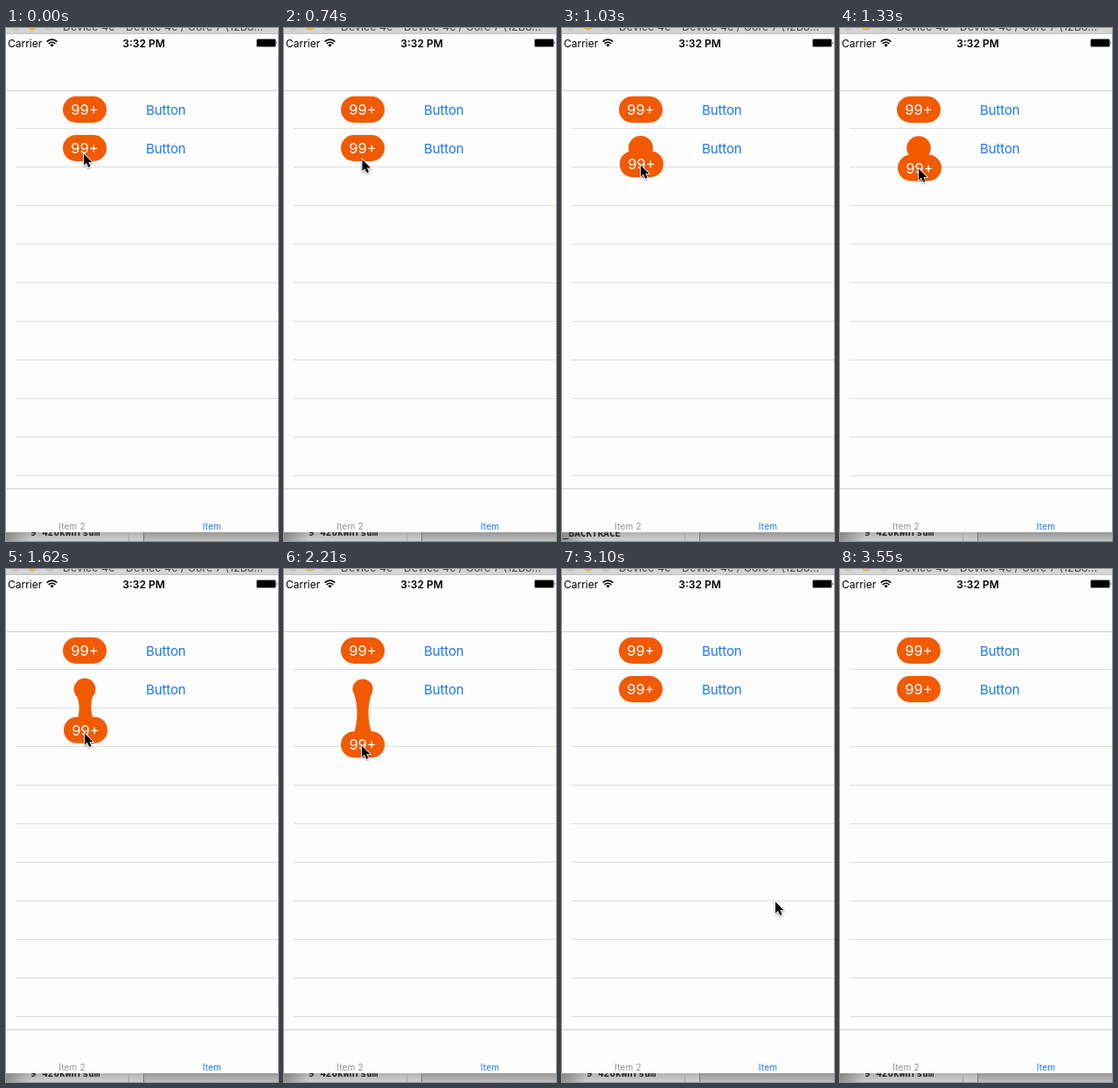
Recreate the animation shown at these times as an HTML page. Size 311 by 585 pixels, loop 3690 ms.

```html
<!DOCTYPE html>
<html lang="en">
<head>
<meta charset="utf-8">
<title>Draggable badge</title>
<style>
  html, body { margin: 0; width: 100%; height: 100%; overflow: hidden; background: #fdfdfd; }
  svg { display: block; width: 311px; height: 585px; font-family: Inter, Roboto, sans-serif; }
  .mono { font: bold 11px "DejaVu Sans Mono", monospace; fill: #222; }
  .button { font-size: 15px; fill: #1a78f5; letter-spacing: -.1px; }
  .badge { fill: #f25a00; }
  .badge text { font-size: 16.5px; fill: #fff; text-anchor: middle; }
  .tab { font-size: 10px; text-anchor: middle; letter-spacing: .2px; }
  #cursor { filter: drop-shadow(0 1px 1px #0006); }
</style>
</head>
<body>
<svg viewBox="0 0 311 585">
  <defs>
    <linearGradient id="shade" x2="0" y2="1">
      <stop stop-color="#989898"/><stop offset="1" stop-color="#bebebe"/>
    </linearGradient>
    <linearGradient id="corner">
      <stop stop-color="#555" stop-opacity=".5"/><stop offset="1" stop-color="#555" stop-opacity="0"/>
    </linearGradient>
    <clipPath id="desktop"><path d="M0 575H311V585H0Z"/></clipPath>
    <g id="pill" class="badge">
      <rect x="-25" y="-15" width="50" height="30" rx="15"/>
      <text y="6">99+</text>
    </g>
  </defs>

  <rect width="311" height="585" fill="#fdfdfd"/>

  <!-- window title bar -->
  <rect width="311" height="7" fill="#d5d4d5"/>
  <path d="M0 6.5H311" stroke="#c2c1c2"/>
  <g stroke-width=".7">
    <circle cx="10" cy="-4" r="6" fill="#d0cdcd" stroke="#b5b2b2"/>
    <circle cx="30" cy="-4" r="6" fill="#f6be35" stroke="#d9a02a"/>
    <circle cx="50" cy="-4" r="6" fill="#d0cdcd" stroke="#b5b2b2"/>
  </g>
  <text x="65" y="2.5" font-size="12.5" fill="#444">Device 4c - Device 4c / Core 7 (12B8…</text>

  <!-- status bar -->
  <g font-size="12">
    <text x="2" y="21.5">Carrier</text>
    <text x="157.5" y="21.5" font-weight="600" text-anchor="middle">3:32 PM</text>
  </g>
  <path d="M46.7 15.7A8 8 0 0 1 58.3 15.7M48.7 18A5 5 0 0 1 56.3 18" fill="none" stroke="#000" stroke-width="1.7"/>
  <path d="M52.5 21.5L50.4 19.4A3 3 0 0 1 54.6 19.4Z"/>
  <rect x="286.5" y="12.5" width="22" height="9" rx="1.5" stroke="#999"/>
  <path d="M309.500 15.500Q311 17 309.500 18.500Z"/>

  <!-- list and tab bar -->
  <rect id="highlight" y="114" width="311" height="45" fill="#d9d9d9"/>
  <path d="M0 71.5H311M0 525.5H311" stroke="#cfcfd1"/>
  <path id="separators" stroke="#dededf"/>
  <text class="button" x="160" y="98.5">Button</text>
  <text class="button" x="160" y="142.5">Button</text>
  <text class="tab" x="75.5" y="571.5" fill="#929292">Item 2</text>
  <text class="tab" x="235.5" y="571.5" fill="#1a78f5">Item</text>

  <!-- desktop below the window -->
  <g clip-path="url(#desktop)">
    <rect y="575" width="311" height="10" fill="url(#shade)"/>
    <rect y="575" width="157" height="10" fill="#fff" opacity=".25"/>
    <rect y="575" width="28" height="10" fill="url(#corner)"/>
    <path d="M140.5 575V585" stroke="#aaa"/>
    <path d="M157.5 575V585" stroke="#777"/>
    <text id="log" class="mono"></text>
  </g>

  <use href="#pill" x="90" y="93"/>
  <path id="neck" class="badge"/>
  <circle id="anchor" class="badge" cx="90" cy="137"/>
  <use id="dragged" href="#pill"/>
  <path id="cursor" d="M1 .5V13.500L4 10.800L6.200 15.800L8.500 14.800L6.400 10H10.500Z"
        stroke="#fff" stroke-width="1.6" paint-order="stroke"/>
</svg>
<script>
  const LOOP = 3690, TICK = LOOP / 25;
  const PRESS = 6, GRAB = 7, RELEASE = 18;
  const HOME = { x: 90, y: 137 };
  const $ = id => document.getElementById(id);

  // Cursor path: tick, x, y
  const path = [
    [3, 88, 143], [7, 89, 156], [9, 89, 160], [11, 89, 187], [15, 88, 201], [16, 87, 207],
    [19, 87, 207], [20, 100, 217], [21, 243, 379], [22, 261, 508], [24, 298, 646]
  ];

  function cursorAt(tick) {
    const next = path.findIndex(key => key[0] > tick);
    const [t1, x1, y1] = path.at(Math.max(next, 0) - 1);
    if (next < 1) return next ? { x: x1, y: y1 } : { x: path[0][1], y: path[0][2] };
    const [t2, x2, y2] = path[next];
    const u = (tick - t1) / (t2 - t1);
    return { x: x1 + (x2 - x1) * u, y: y1 + (y2 - y1) * u };
  }

  // The badge trails the cursor by a quarter of a tick.
  function badgeAt(tick) {
    const { x, y } = cursorAt(tick - .25);
    return { x: x + 2, y };
  }

  const show = (id, visible) => $(id).setAttribute("visibility", visible ? "visible" : "hidden");
  const set = (id, attributes) => {
    for (const name in attributes) $(id).setAttribute(name, attributes[name]);
  };

  // Two curves bent toward the midpoint join the shrinking anchor to the badge.
  function drawNeck(end) {
    const dx = end.x - HOME.x, dy = end.y - HOME.y, distance = Math.hypot(dx, dy);
    const r = 15 - distance / 18;
    const side = (p, k) => `${p.x + dy / distance * k} ${p.y - dx / distance * k}`;
    const middle = `${HOME.x + dx / 2} ${HOME.y + dy / 2}`;
    set("anchor", { r });
    set("neck", {
      d: `M${side(HOME, r)}Q${middle} ${side(end, 15)}L${side(end, -15)}Q${middle} ${side(HOME, -r)}Z`
    });
  }

  function draw() {
    // The picture steps once per tick; the small lead absorbs rounding of the step times.
    const tick = Math.floor((performance.now() % LOOP + 12) / TICK);
    const dragging = tick >= GRAB && tick < RELEASE;
    const cursor = cursorAt(tick);
    const badge = dragging ? badgeAt(tick) : HOME;

    set("cursor", { transform: `translate(${cursor.x} ${cursor.y})` });
    set("dragged", badge);
    if (dragging) drawNeck(badge);
    show("neck", dragging);
    show("anchor", dragging);
    show("highlight", tick === PRESS);

    const tracing = tick === GRAB;
    set("log", tracing ? { x: 1, y: 580 } : { x: 28, y: 578.5 });
    $("log").textContent = tracing ? "_BACKTRACE" : "9 420kWhrsum";
    requestAnimationFrame(draw);
  }

  set("separators", {
    d: Array.from({ length: 10 }, (_, i) => `M11 ${114.5 + 44 * i}H311`).join("")
  });
  draw();
</script>
</body>
</html>
```
